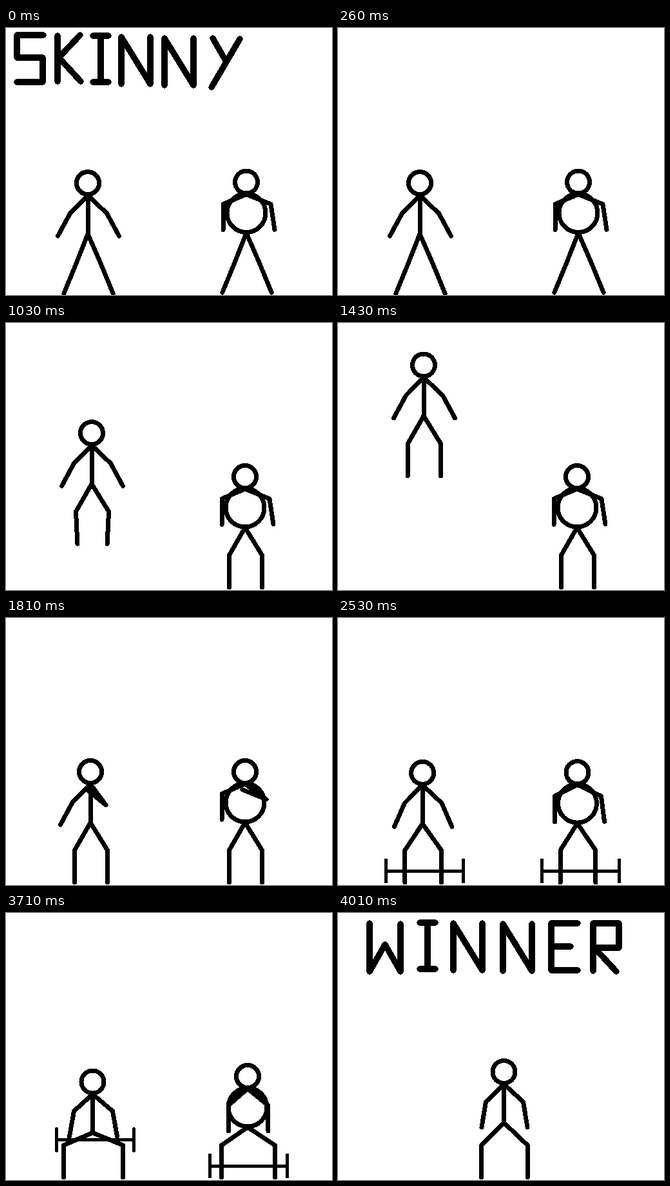
An HTML page for the animation above (4090 ms loop, 506 px wide and 415 px high).

```html
<!DOCTYPE html>
<html lang="en">
<head>
<meta charset="utf-8">
<style>
html, body { margin: 0; width: 100%; height: 100%; overflow: hidden; background: #fff; }
svg { display: block; }
path { fill: none; stroke: #000; stroke-linecap: round; stroke-linejoin: round; shape-rendering: crispEdges; }
#title { stroke-width: 9.5; }
#bodies { stroke-width: 7; }
#bars { stroke-width: 5; }
#shoulders { fill: #000; stroke: none; }
</style>
</head>
<body>
<svg width="506" height="415" viewBox="0 0 506 415">
  <path id="title"/><path id="shoulders"/><path id="bodies"/><path id="bars"/>
</svg>
<script>
const LOOP = 4090, STEP = 100, WIN_TIME = 3810;
const FLOOR = 411, BAR_REST = 393, GRIP = 3410;
const LEG = 50, ARM = 40, SPINE = 60, BELLY = 30;
const HANG = 43, STRAIGHT = 46.2; // height of hip over knee

const N = 'v-73l45 73v-73', I = 'h24m-12 0v72m-12 0h24';
const SKINNY = `M58 11H17V46H57V84H17M80 12V83M115 11L82 46L116 83M135 12${I}
  M179 87${N}M246 89${N}M321 16L341 51M363 17L319 92`;
const WINNER = `M49 16V91L73 49L97 91V17M127 15${I}M179 89${N}M256 90${N}
  M372 16H331V89H372M331 52H361M396 90V16H436V54H398L432 91`;

let now = 0, out;
const ramp = (from, to) => Math.min(1, Math.max(0, (now - from) / (to - from)));
const during = (from, to) => now >= from && now < to;
const other = (length, side) => Math.sqrt(length * length - side * side);
const line = (...p) => 'M' + p.join(' ');
const ring = (x, y, r) => `M${x - r} ${y}a${r} ${r} 0 1 0 ${2 * r} 0a${r} ${r} 0 1 0 ${-2 * r} 0`;

// Every limb is two rigid bones, so a spread or a drop fixes each joint.
function addFigure({ x, lift = 0, thigh = 35, shin = 0, elbow, hands, curl, belly }) {
  const spread = other(LEG, thigh), shinDrop = other(LEG, shin);
  const hip = FLOOR - thigh - shinDrop - lift, neck = hip - SPINE;
  out.bodies += ring(x, neck - 19, 17.5);
  out.bodies += belly ? ring(x, neck + BELLY - 1, BELLY) : line(x, neck, x, hip);
  for (const side of [-1, 1]) {
    const at = distance => x + 1 + side * distance;
    out.bodies += line(x, hip, at(spread), hip + thigh, at(spread + shin), hip + thigh + shinDrop);

    const curled = curl && curl.side === side;
    const reach = curled ? curl.elbow : elbow;
    const tilt = curled ? curl.hand : hands[side < 0 ? 0 : 1];
    const elbowY = neck + other(ARM, reach);
    const handY = elbowY + other(ARM, tilt) * (curled ? -1 : 1);
    out.bodies += line(x, neck, at(reach), elbowY, at(reach + tilt), handY);

    // Solid shoulder where the arm lies over the belly
    if (belly && (curled || now > 2800)) {
      out.shoulders += `M${x} ${neck - 1}a${BELLY} ${BELLY} 0 0 ${side < 0 ? 0 : 1} ${side * BELLY} ${BELLY}z`;
    }
  }
  return neck;
}

function addBar(x, y) {
  out.bars += `M${x - 60} ${y}h120m0 -17v34m-120 0v-34`;
}

function contest() {
  const takeoff = ramp(410, 610), crouch = ramp(2410, 3010);
  const side = during(1810, 2010) ? 1 : during(2110, 2310) ? -1 : 0;
  const stance = STRAIGHT + (HANG - STRAIGHT) * takeoff;
  const shinAngle = landing => 19 * (1 - takeoff) - 12 * takeoff * (1 - ramp(610, landing));
  const pull = ramp(GRIP, 3710);

  if (now < 200) out.title = SKINNY;
  const tilt = 19 - 18.5 * crouch + 6.5 * ramp(3010, 3710);
  const neck = addFigure({
    x: 127 + 6 * takeoff - 2 * ramp(1410, 1710) + crouch + 2.5 * ramp(3010, 3710),
    lift: -1.5 + 31 * takeoff + 48 * ramp(610, 1110) + 96 * ramp(1110, 1410) - 173.5 * ramp(1410, 1710),
    thigh: stance - 10.5 * crouch - 53 * ramp(3010, GRIP) + 40 * pull,
    shin: shinAngle(1110),
    elbow: 28.5 + 1.5 * crouch,
    hands: [tilt, tilt],
    curl: { side, elbow: 23, hand: -31 }
  });
  const struggle = ramp(3010, 3510);
  addFigure({
    belly: true,
    x: 373 - 2 * takeoff + 3 * crouch + struggle,
    lift: 20 * Math.sin(Math.PI * ramp(410, 1010)),
    thigh: stance - 7 * crouch - 8 * struggle,
    shin: shinAngle(1010),
    elbow: 37 - 6.5 * crouch,
    hands: [0, 6 - 5.5 * crouch],
    curl: { side, elbow: 32, hand: -37 }
  });
  if (now >= 2410) {
    addBar(134.5 + 4 * pull, pull ? Math.min(BAR_REST, neck + 71) : BAR_REST);
    addBar(376.5, BAR_REST);
  }
}

function victory() {
  out.title = WINNER;
  addFigure({ x: 257.5, elbow: 29, hands: [6.5, 6.5] });
}

const start = performance.now();
function tick() {
  // Each drawing is held for one step.
  const time = (performance.now() - start) % LOOP;
  now = Math.floor((time - 10) / STEP) * STEP + 10;
  out = { title: '', shoulders: '', bodies: '', bars: '' };
  if (now >= WIN_TIME) victory();
  else contest();
  for (const id in out) document.getElementById(id).setAttribute('d', out[id]);
  requestAnimationFrame(tick);
}
tick();
</script>
</body>
</html>
```
